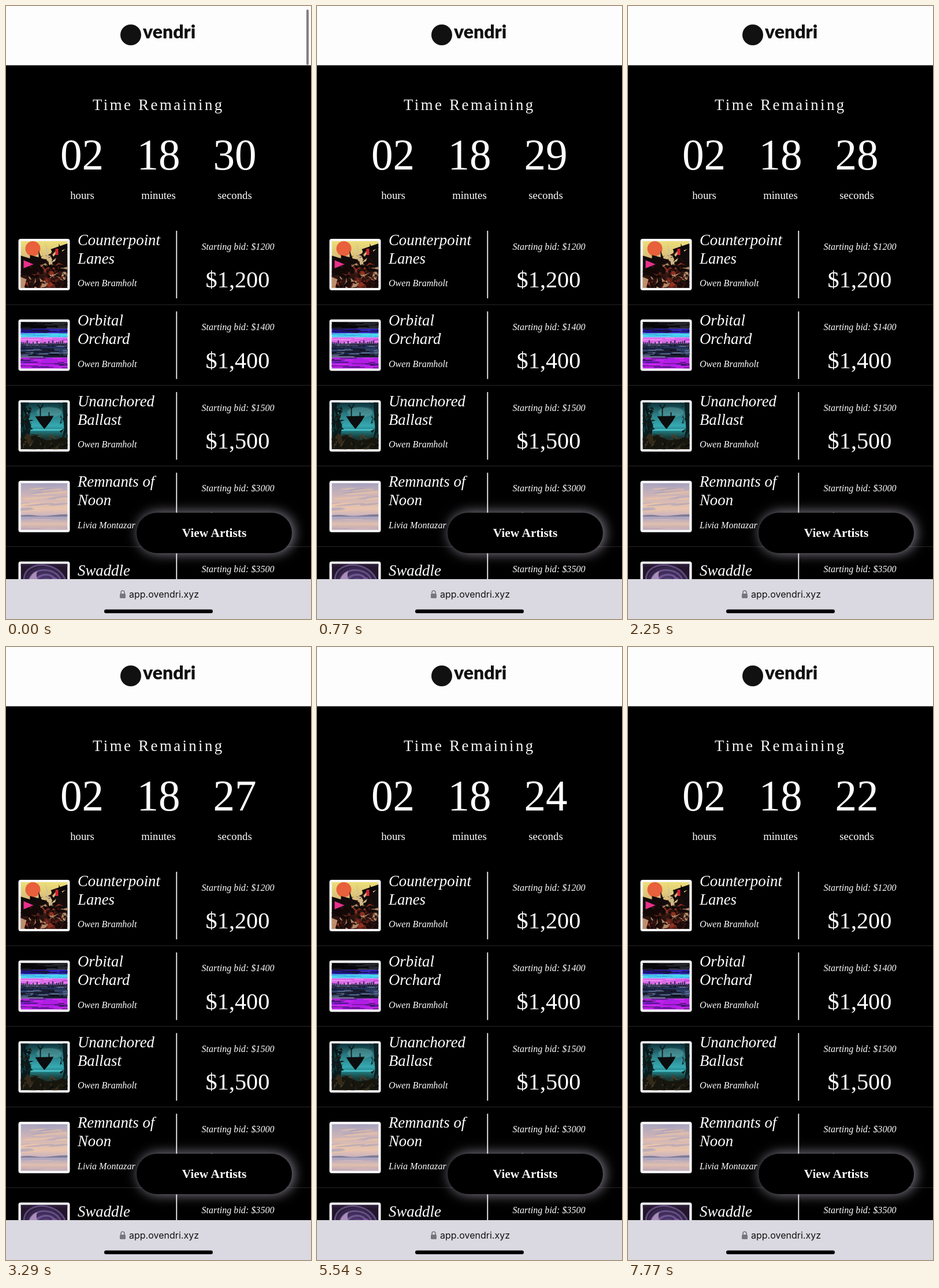
An HTML page for the animation above (8 s loop, 528 px wide and 1061 px high).

```html
<!DOCTYPE html>
<html lang="en">
<head>
<meta charset="utf-8">
<title>Auction countdown</title>
<style>
  html, body { margin: 0; width: 100%; height: 100%; overflow: hidden; background: #000; }
  svg { display: block; width: 100vw; height: 100vh; }
  text { font-family: "Liberation Serif", "Times New Roman", serif; fill: #fff; }
  .mid { text-anchor: middle; }
  .heading { font-size: 26.9px; letter-spacing: 3.36px; fill: #f6f6f6; }
  .digits { font-size: 75.2px; }
  .unit { font-size: 18.8px; }
  .title { font-size: 26.8px; font-style: italic; }
  .small { font-size: 16.1px; font-style: italic; }
  .price { font-size: 40.3px; }
  .button { font-size: 21.4px; font-weight: 700; }
  .brand { font: 900 32px Lato, sans-serif; fill: #111; }
  .address { font: 400 16px Inter, sans-serif; fill: #111; }
  .glow { filter: drop-shadow(3px 0 11px rgba(235, 228, 250, .62)); }
  .scrollbar { animation: fade 8s linear infinite; }
  @keyframes fade { 0%, .6% { opacity: 1; } 5%, 100% { opacity: 0; } }
</style>
</head>
<body>
<svg viewBox="0 0 528 1061" preserveAspectRatio="none">
  <defs>
    <clipPath id="picture"><rect width="81" height="81"/></clipPath>
    <linearGradient id="city" x2="0" y2="1">
      <stop offset="0" stop-color="#ecdf78"/><stop offset=".4" stop-color="#d5b87c"/>
      <stop offset=".6" stop-color="#3c1a14"/><stop offset="1" stop-color="#150907"/>
    </linearGradient>
    <linearGradient id="lagoon" x2="0" y2="1">
      <stop offset="0" stop-color="#0c3138"/><stop offset=".25" stop-color="#2a7a82"/>
      <stop offset=".5" stop-color="#36aab2"/><stop offset=".62" stop-color="#1f7478"/>
      <stop offset=".75" stop-color="#1a3a38"/><stop offset="1" stop-color="#17120c"/>
    </linearGradient>
    <linearGradient id="dusk" x2="0" y2="1">
      <stop offset="0" stop-color="#aaa5be"/><stop offset=".3" stop-color="#d0b5b6"/>
      <stop offset=".55" stop-color="#e9c5ae"/><stop offset=".68" stop-color="#cdb5bd"/>
      <stop offset=".74" stop-color="#aaa4c0"/><stop offset=".87" stop-color="#e1bfaf"/>
      <stop offset="1" stop-color="#b8a4b3"/>
    </linearGradient>
    <radialGradient id="violet">
      <stop offset="0" stop-color="#7d66a8"/><stop offset=".55" stop-color="#4b3668"/>
      <stop offset="1" stop-color="#22152c"/>
    </radialGradient>
  </defs>

  <rect width="528" height="1061"/>
  <rect width="528" height="102.6" fill="#fdfdfe"/>
  <circle cx="216" cy="50" r="18" fill="#111"/>
  <text class="brand" x="237" y="56">vendri</text>
  <rect class="scrollbar" x="520" y="6" width="4" height="96" rx="2" fill="#808084"/>

  <text class="heading" x="150" y="180">Time Remaining</text>
  <g class="mid">
    <text class="digits" x="131.5" y="283">02</text>
    <text class="digits" x="264" y="283">18</text>
    <text class="digits" x="396" y="283" id="seconds">30</text>
    <text class="unit" x="132" y="334">hours</text>
    <text class="unit" x="264" y="334">minutes</text>
    <text class="unit" x="396" y="334">seconds</text>
  </g>

  <g id="lots"></g>

  <rect class="glow" x="226" y="877" width="269" height="70" rx="35"/>
  <text class="button mid" x="360.5" y="919">View Artists</text>

  <rect y="992" width="528" height="69" fill="#dad9e1"/>
  <rect x="197" y="1017" width="10" height="8" rx="1.5" fill="#77767c"/>
  <path d="M199 1018v-3a3 3 0 0 1 6 0v3" fill="none" stroke="#77767c" stroke-width="1.6"/>
  <text class="address mid" x="273.5" y="1024">app.ovendri.xyz</text>
  <rect x="170" y="1044.5" width="188" height="6.5" rx="3.2"/>
</svg>
<script>
const PITCH = 139.6, LOOP = 8000;

let seed = 7;
const random = (min, max) => {
  seed = (seed * 16807) % 2147483647;
  return min + (max - min) * seed / 2147483647;
};
const pick = list => list[Math.floor(random(0, list.length))];
const rect = (x, y, w, h, fill) => `<rect x="${x}" y="${y}" width="${w}" height="${h}" fill="${fill}"/>`;
const path = (d, fill) => `<path d="${d}" fill="${fill}"/>`;
const repeat = (count, draw) => Array.from({ length: count }, (_, i) => draw(i)).join('');
const text = (cls, x, y, content) => `<text class="${cls}" x="${x}" y="${y}">${content}</text>`;
const backdrop = id => rect(0, 0, 81, 81, `url(#${id})`);

// Scatters irregular four-sided strokes over a box.
const strokes = (count, [left, top, right, bottom], size, colors) => repeat(count, () => {
  const side = () => random(-size, size).toFixed(1);
  return path(`M${random(left, right)} ${random(top, bottom)}l${side()} ${side()}l${side()} ${side()}l${side()} ${side()}Z`, pick(colors));
});

function cityArt() {
  return backdrop('city')
    + '<circle cx="21" cy="13" r="13" fill="#e8603c"/>'
    + path('M0 25L16 30V24L31 28V16L36 30L50 33L54 16L66 14V4L72 18L81 10V55L60 48L42 56L0 60Z', '#120b0b')
    + path('M52 14L81 4V12L56 22Z', '#0b0809')
    + path('M42 0L50 26L46 30Z', '#d8c391')
    + strokes(26, [34, 24, 60, 50], 7, ['#d0b684', '#120b0b', '#a58a60', '#2c1512'])
    + strokes(90, [0, 42, 81, 81], 10, ['#5c2118', '#8f3020', '#120806', '#120806', '#b08a68', '#2a1010'])
    + path('M5 33L22 40L5 47Z', '#e8308c')
    + rect(60, 13, 5, 11, '#d42431')
    + path('M0 62L10 66L6 81H0Z', '#c08e6c');
}

function glitchArt() {
  const bands = [
    [0, 12, ['#050507', '#17171d', '#08080b', '#2e3038']],
    [12, 20, ['#20159b', '#4432dc', '#161129']],
    [20, 27, ['#49d5f1', '#68c2fa', '#3ca8e6']],
    [27, 38, ['#dc67ec', '#ee8cec', '#c048df']],
    [38, 62, ['#1a1f35', '#44577f', '#243b6f', '#0c0d17', '#6b7793']],
    [62, 81, ['#b41de5', '#8c20dc', '#d52bee', '#281451']]
  ];
  return bands.map(([top, end, colors]) =>
    rect(0, top, 81, end - top, colors[0]) +
    repeat((end - top) * 3, () => rect(random(-20, 75), random(top, end - 1.5), random(8, 42), random(.7, 2), pick(colors)))
  ).join('')
    + repeat(24, i => rect(i * 3.4, 38 - random(0, 6), 2.2, 7, '#343052'));
}

function islandArt() {
  const shade = ['#081719', '#0c2628', '#123c40', '#1b1a12'];
  return backdrop('lagoon')
    + '<ellipse cx="49" cy="17" rx="22" ry="9" fill="#6bb0b0" opacity=".4"/>'
    + rect(0, 46, 81, 3, '#48bcc4')
    + path('M0 0H14L10 18L18 40L15 58L22 68H0Z', '#091a1c')
    + path('M72 0H81V81H68L75 45Z', '#0c2023')
    + path('M0 62Q20 53 36 62T81 56V81H0Z', '#17160e')
    + strokes(34, [0, 0, 17, 70], 7, shade)
    + strokes(24, [70, 0, 81, 70], 6, shade)
    + strokes(40, [0, 60, 81, 81], 8, ['#17160e', '#332a1a', '#4d3f28', '#0d0d0a'])
    + path('M25 24L57 23L52 32L41 46L33 36Z', '#0b0c0d')
    + '<path d="M34 24V10L29 4M34 11L39 3M49 24V17" fill="none" stroke="#0e1617" stroke-width="1.8"/>';
}

function duskArt() {
  return backdrop('dusk')
    + repeat(20, i => `<ellipse cx="${random(0, 81)}" cy="${2 + i * 2.3}" rx="${random(14, 34)}" ry="${random(1, 2.6)}" fill="${pick(['#f0c9a6', '#9f9bb8', '#e6bda8', '#aba5c0'])}" opacity=".55" transform="rotate(-5 40 25)"/>`)
    + path('M0 56Q13 54 25 56T52 56T81 54V58H0Z', '#7c7a96')
    + repeat(9, () => rect(random(0, 45), random(60, 80), random(15, 40), .8, '#d4b9bc'));
}

function swirlArt() {
  return backdrop('violet') + rect(0, 0, 81, 5, '#2b1b36')
    + repeat(6, i => `<ellipse cx="42" cy="31" rx="${12 + i * 5}" ry="${8 + i * 4}" fill="none" stroke="${i % 2 ? '#8b74b4' : '#3c2b58'}" stroke-width="3" opacity=".55" transform="rotate(${i * 7 - 18} 42 31)"/>`)
    + path('M13 30Q20 14 29 13Q25 19 30 30Z', '#a98cb8')
    + path('M50 30Q59 17 67 30Z', '#7b589d');
}

const lots = [
  [['Counterpoint', 'Lanes'], 'Owen Bramholt', 1200, cityArt],
  [['Orbital', 'Orchard'], 'Owen Bramholt', 1400, glitchArt],
  [['Unanchored', 'Ballast'], 'Owen Bramholt', 1500, islandArt],
  [['Remnants of', 'Noon'], 'Livia Montazar', 3000, duskArt],
  [['Swaddle'], '', 3500, swirlArt]
];

document.getElementById('lots').innerHTML = lots.map(([title, artist, bid, art], i) => {
  const top = title.length > 1 ? 413.5 : 428;
  return `<g transform="translate(0 ${i * PITCH})">
    <rect x="21.5" y="403" width="89" height="89" rx="4" fill="#f8f8fa"/>
    <g transform="translate(25.5 407)" clip-path="url(#picture)">${art()}</g>
    ${title.map((line, n) => text('title', 124, top + n * 32, line)).join('')}
    ${text('small', 124, 485, artist)}
    ${rect(294.4, 389, 1.8, 117, '#f4f4f4')}
    ${text('small mid', 401.5, 421.5, 'Starting bid: $' + bid)}
    ${text('price mid', 401, 487, '$' + bid.toLocaleString('en-US'))}
    ${rect(0, 516.5, 528, 1, '#2b2727')}
  </g>`;
}).join('');

const seconds = document.getElementById('seconds');
function tick(now) {
  const value = String(30 - Math.floor((now % LOOP + 480) / 1000));
  if (seconds.textContent !== value) seconds.textContent = value;
  requestAnimationFrame(tick);
}
requestAnimationFrame(tick);
</script>
</body>
</html>
```
